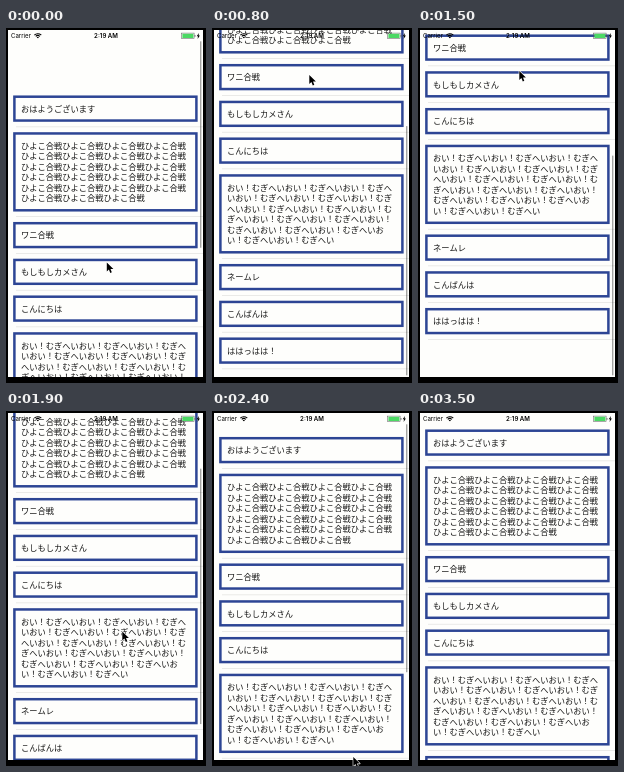
These frames come from a looping animation (200x355 px, 3.6 s). An HTML page with a canvas:

```html
<!DOCTYPE html>
<html lang="ja">
<head>
<meta charset="utf-8">
<title>List scroll</title>
<style>
html, body { margin: 0; width: 100%; height: 100%; overflow: hidden; background: #000; }
canvas { display: block; width: 200px; height: 355px; }
</style>
</head>
<body>
<canvas id="stage"></canvas>
<script>
const W = 200, H = 355, LOOP = 3600, STEP = 100;
const TOP = 13.3, VIEW = 334;
const SIZE = 8.25, LEAD = 10.5, PER_LINE = 20;
const CJK = '"Noto Sans CJK JP", "Noto Sans CJK", sans-serif';
const LATIN = 'Inter, "Liberation Sans", sans-serif';
const INK = '#161616', BORDER = '#2d4594', PAPER = '#fefefc';

const canvas = document.getElementById('stage');
const ctx = canvas.getContext('2d');
const dpr = window.devicePixelRatio || 1;
canvas.width = W * dpr;
canvas.height = H * dpr;

// Fixed line length; a line never starts with "！".
function wrap(text) {
  const lines = [];
  for (let i = 0; i < text.length;) {
    let end = Math.min(i + PER_LINE, text.length);
    if (text[end] === '！') end--;
    lines.push(text.slice(i, end));
    i = end;
  }
  return lines;
}

let total = 0;
const rows = [
  'おはようございます',
  'ひよこ合戦'.repeat(23),
  'ワニ合戦',
  'もしもしカメさん',
  'こんにちは',
  'おい！むぎへい'.repeat(16),
  'ネームレ',
  'こんばんは',
  'ははっはは！'
].map(text => {
  const lines = wrap(text);
  const row = { lines, y: total, h: 36.75 + (lines.length - 1) * 10.6 };
  total += row.h;
  return row;
});

// Gesture turning points: list offset and pointer position
const poses = [
  { t: 0, offset: 49, x: 100.5, y: 234 },
  { t: 400, offset: -33, x: 96.5, y: 45 },
  { t: 800, offset: -109, x: 97, y: 46.5 },
  { t: 1150, offset: -101, x: 101, y: 150 },
  { t: 1500, offset: -138.5, x: 101, y: 42.5 },
  { t: 1900, offset: -58, x: 116, y: 220 },
  { t: 2400, offset: 7.5, x: 141, y: 345.5 },
  { t: 2900, offset: 0, x: 147, y: 358 },
  { t: LOOP, offset: 0, x: 147, y: 358 }
];

// Smooth curve through the poses, without overshoot at turning points.
function curve(name, t) {
  const i = poses.findLastIndex(p => p.t <= t);
  const slope = k => (poses[k + 1][name] - poses[k][name]) / (poses[k + 1].t - poses[k].t);
  const tangent = k => {
    if (k === 0) return slope(0);
    if (k === poses.length - 1) return 0;
    const a = slope(k - 1), b = slope(k);
    return a * b <= 0 ? 0 : 2 * a * b / (a + b);
  };
  const p = poses[i], q = poses[i + 1];
  const d = q.t - p.t, u = (t - p.t) / d;
  const e = u * u * (3 - 2 * u);
  return p[name] * (1 - e) + q[name] * e
    + d * u * (1 - u) * ((1 - u) * tangent(i) - u * tangent(i + 1));
}

function drawList(offset) {
  ctx.font = `${SIZE}px ${CJK}`;
  ctx.textBaseline = 'middle';
  ctx.textAlign = 'left';
  ctx.lineWidth = 2.5;
  for (const row of rows) {
    const y = TOP + offset + row.y;
    ctx.strokeStyle = BORDER;
    ctx.strokeRect(8.4, y + 6.4, 182, row.h - 12.9);
    ctx.fillStyle = INK;
    row.lines.forEach((line, i) => ctx.fillText(line, 15, y + 18.4 + i * LEAD));
    ctx.fillStyle = '#d4d4d2';
    ctx.fillRect(10, y + row.h - 0.4, 187, 0.5);
  }
}

function drawScrollBar(offset, t) {
  const alpha = Math.max(0, Math.min(1, (3050 - t) / 250));
  const limit = total - VIEW;
  const pos = Math.max(0, Math.min(limit, -offset));
  const over = Math.abs(offset + pos);
  const len = VIEW * VIEW / total - over;
  const y = TOP + pos * VIEW / total + (-offset > limit ? over : 0);
  ctx.fillStyle = `rgba(0, 0, 0, ${0.36 * alpha})`;
  ctx.fillRect(194, y, 1.4, len);
}

function drawStatus() {
  ctx.fillStyle = '#000';
  ctx.textBaseline = 'alphabetic';
  ctx.font = `6.1px ${LATIN}`;
  ctx.textAlign = 'left';
  ctx.fillText('Carrier', 5, 10.2);
  ctx.font = `600 6.1px ${LATIN}`;
  ctx.textAlign = 'center';
  ctx.fillText('2:19 AM', 100, 10.2);

  // Wi-Fi
  ctx.strokeStyle = '#000';
  ctx.lineWidth = 1.1;
  for (const r of [0.9, 2.8, 4.7]) {
    ctx.beginPath();
    ctx.arc(31.8, 10.4, r, -Math.PI * 0.76, -Math.PI * 0.24);
    ctx.stroke();
  }

  // Battery
  ctx.lineWidth = 0.5;
  ctx.strokeStyle = ctx.fillStyle = '#555';
  ctx.strokeRect(175.7, 5.1, 12.4, 5.6);
  ctx.fillRect(188.6, 7, 0.8, 1.8);
  ctx.fillStyle = '#4cd964';
  ctx.fillRect(176.4, 5.8, 11, 4.2);
  ctx.fillStyle = '#000';
  path([[192.9, 5], [190.7, 8.3], [192, 8.3], [191.6, 10.9], [193.9, 7.4], [192.6, 7.4]]);
  ctx.fill();
}

function path(points) {
  ctx.beginPath();
  points.forEach(([x, y]) => ctx.lineTo(x, y));
  ctx.closePath();
}

function drawPointer(x, y) {
  ctx.save();
  ctx.translate(x, y);
  path([[0.3, 0.4], [0.3, 9.6], [2.4, 7.6], [3.8, 11], [5.3, 10.3], [4, 7.1], [6.9, 7.1]]);
  ctx.lineJoin = 'round';
  ctx.lineWidth = 1.2;
  ctx.strokeStyle = '#fff';
  ctx.stroke();
  ctx.fillStyle = '#000';
  ctx.fill();
  ctx.restore();
}

function draw(t) {
  ctx.setTransform(dpr, 0, 0, dpr, 0, 0);
  ctx.fillStyle = '#000';
  ctx.fillRect(0, 0, W, H);
  ctx.save();
  ctx.beginPath();
  ctx.rect(2, 2, 195, 347);
  ctx.clip();
  ctx.fillStyle = PAPER;
  ctx.fillRect(0, 0, W, H);
  const offset = curve('offset', t);
  drawList(offset);
  drawScrollBar(offset, t);
  drawStatus();
  ctx.restore();
  drawPointer(curve('x', t), curve('y', t));
}

const start = performance.now();
function tick() {
  const t = (performance.now() - start) % LOOP;
  draw(Math.floor(t / STEP) * STEP);
  requestAnimationFrame(tick);
}
tick();
</script>
</body>
</html>
```
